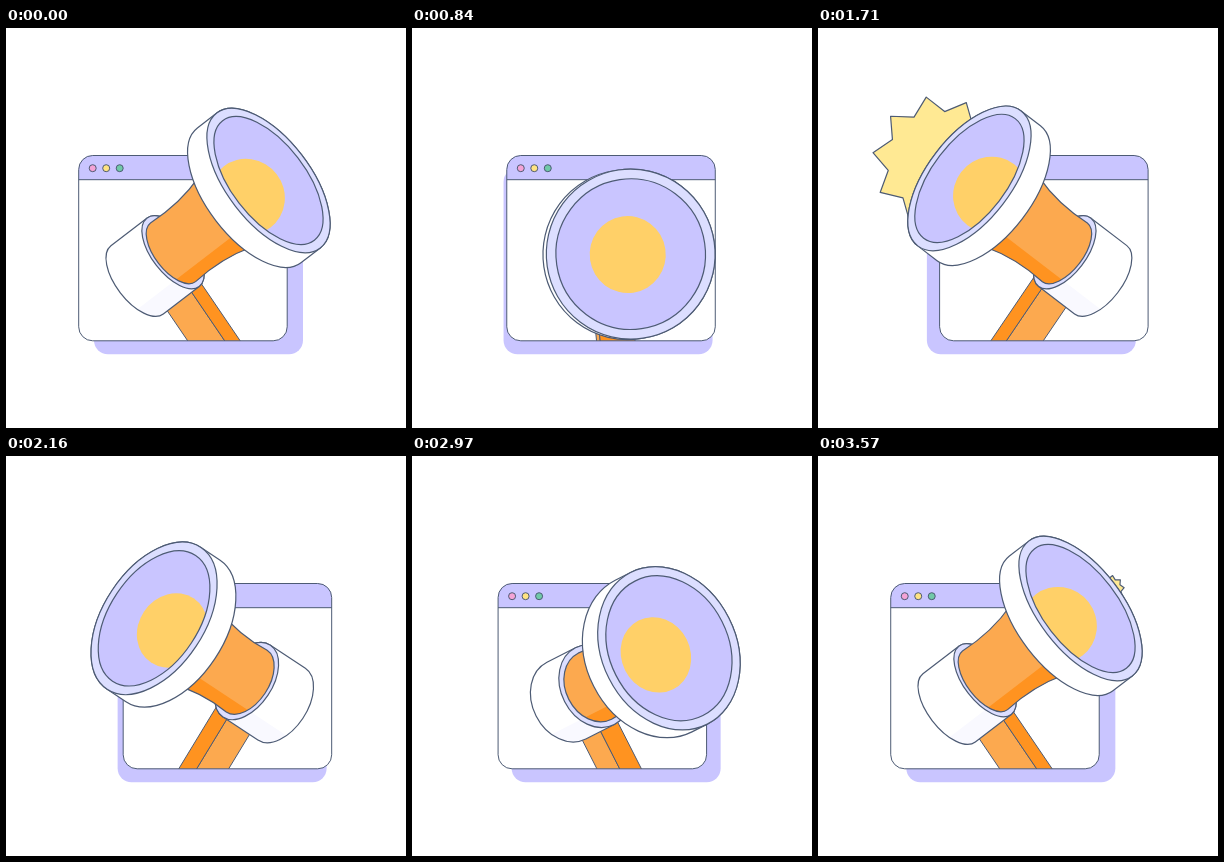
An HTML page with a canvas for the animation above (3600 ms loop, 400 px wide and 400 px high).

```html
<!DOCTYPE html>
<html lang="en">
<head>
<meta charset="utf-8">
<title>Megaphone</title>
<style>
html, body { margin: 0; width: 100%; height: 100%; overflow: hidden; background: #fff; }
canvas { display: block; width: 400px; height: 400px; }
</style>
</head>
<body>
<canvas></canvas>
<script>
const canvas = document.querySelector('canvas');
const ctx = canvas.getContext('2d');
const ratio = window.devicePixelRatio || 1;
canvas.width = canvas.height = 400 * ratio;

const LOOP = 3600, HALF = LOOP / 2, TAU = Math.PI * 2;
const LINE = '#4d5b74', LAVENDER = '#c9c5ff', PALE = '#dcdeff';
const ORANGE = '#fca94f', DARK = '#ff9320', DISC = '#ffd068', BURST = '#ffe993';

// Poses from facing the viewer (turn 0) to fully turned (turn 1):
// turn, rim x, y, axis x, y, ring x, y, disc depth, disc width,
// handle left, middle, right, slope
const POSES = [
  [0, 0, 228, 0, 0, 0, 232, 0, 1, -20, -20, 20, 0],
  [.346, 33, 219.4, .34, -.07, -9, 231, 8.7, .96, -17, -6, 20, .29],
  [.655, 51, 189.6, .56, -.29, -25, 230, 15, .89, -18, 5.5, 27, .52],
  [.83, 60, 172.5, .65, -.383, -29.5, 226, 18.5, .84, -17, 11.5, 31, .56],
  [1, 55.5, 151.3, .69, -.53, -40, 224.3, 27, .97, -21, 16, 31.5, .68]
];

function poseAt(turn) {
  const last = POSES.length - 1;
  let i = 0;
  while (i < last - 1 && POSES[i + 1][0] < turn) i++;
  const span = POSES[i + 1][0] - POSES[i][0], u = (turn - POSES[i][0]) / span;
  const tangent = (k, n) => {
    const a = POSES[Math.max(k - 1, 0)], b = POSES[Math.min(k + 1, last)];
    return (b[n] - a[n]) / (b[0] - a[0]) * span;
  };
  return POSES[i].map((p, n) => {
    const end = POSES[i + 1][n], m = tangent(i, n), w = tangent(i + 1, n);
    return p + u * (m + u * (3 * (end - p) - 2 * m - w + u * (2 * (p - end) + m + w)));
  });
}

// Swing from 1 to -1 and back, slow at both ends.
function swing(t) {
  let u = (t % HALF) / HALF;
  u += .02 * u * Math.sin(Math.PI * u) ** 2;
  const p = u < .5 ? .5 * (2 * u) ** 2.6 : 1 - .5 * (2 - 2 * u) ** 2.6;
  return (t < HALF ? 1 : -1) * (1 - 2 * p);
}

function paint(fill, stroke = true) {
  if (fill) { ctx.fillStyle = fill; ctx.fill(); }
  if (stroke) ctx.stroke();
}

function group(draw) {
  ctx.save();
  draw();
  ctx.restore();
}

function oval(x, y, rx, ry) {
  ctx.beginPath();
  ctx.ellipse(x, y, rx, ry, 0, 0, TAU);
}

// Side view of a cylinder whose front disc is centred at the origin.
function cylinder(depth, rx, ry) {
  ctx.beginPath();
  ctx.ellipse(-depth, 0, rx, ry, 0, Math.PI / 2, Math.PI * 1.5);
  ctx.ellipse(0, 0, rx, ry, 0, -Math.PI / 2, Math.PI / 2);
  ctx.closePath();
}

// Fill the lower side of the current path, then outline the path.
function shadeLower(color, path) {
  group(() => {
    ctx.clip();
    ctx.fillStyle = color;
    ctx.fillRect(-200, 23.5, 400, 100);
  });
  path();
  ctx.stroke();
}

function handle(side, left, middle, right, slope) {
  const bar = (a, b, color) => {
    ctx.beginPath();
    ctx.moveTo(a, 314);
    ctx.lineTo(a - slope * 74, 240);
    ctx.lineTo(b - slope * 74, 240);
    ctx.lineTo(b, 314);
    ctx.closePath();
    paint(color);
  };
  group(() => {
    ctx.beginPath();
    ctx.rect(0, 200, 400, 112.7);
    ctx.clip();
    ctx.translate(203.5, 0);
    ctx.scale(side, 1);
    bar(left, middle, ORANGE);
    bar(middle, right, DARK);
  });
}

function browser(phase, drawHandle) {
  const x = 97.3 - 24.6 * Math.cos(phase);
  const frame = () => {
    ctx.beginPath();
    ctx.roundRect(x, 127.5, 208.5, 185.3, 14);
  };
  ctx.lineWidth = 1;
  ctx.beginPath();
  ctx.roundRect(99 - 12.7 * Math.cos(phase - Math.PI / 6), 140, 209, 186.3, 14);
  paint(LAVENDER, false);
  frame();
  paint('#fff', false);
  group(() => {
    ctx.clip();
    ctx.beginPath();
    ctx.rect(x - 2, 125, 214, 26.7);
    paint(LAVENDER);
  });
  ['#f4a3d6', '#ffe382', '#70c9a8'].forEach((color, i) => {
    oval(x + 14 + 13.5 * i, 140.2, 3.5, 3.5);
    paint(color);
  });
  drawHandle();
  frame();
  ctx.stroke();
}

function burst(t, x, y) {
  const [start, peak, end] = t < 2400 ? [1170, 1420, 1870] : [2985, 3240, 3590];
  if (t <= start || t >= end) return;
  const size = t < peak
    ? 1 - (1 - (t - start) / (peak - start)) ** 2
    : 1 - ((t - peak) / (end - peak)) ** 3.2;
  const radius = 87 * size;
  const cx = x + 29 + .04 * radius, cy = y - 19.5 + .04 * radius;
  ctx.beginPath();
  for (let i = 0; i < 20; i++) {
    const r = radius * (i % 2 ? .77 : 1), a = .136 + i * Math.PI / 10;
    ctx.lineTo(cx + r * Math.cos(a), cy - r * Math.sin(a));
  }
  ctx.closePath();
  paint(BURST);
}

function megaphone(t, turn, pose) {
  const [, rimX, rimLevel, axisX, axisY, ringX, ringY, discDepth, discWidth] = pose;
  const rimY = rimLevel + 1.2 * turn; // the left swing rises a little higher
  const lean = Math.min(Math.hypot(axisX, axisY), 1);
  const flat = Math.sqrt(1 - lean * lean);
  const angle = Math.atan2(axisY, axisX);
  const length = 109 * lean;

  group(() => {
    ctx.lineWidth = 1.2;
    ctx.translate(207, 0);
    ctx.scale(turn < 0 ? -1 : 1, 1);
    burst(t, rimX, rimY);

    group(() => {
      ctx.translate(ringX, ringY);
      ctx.rotate(angle);
      const cap = () => cylinder(52 * lean, 43 * flat, 43);
      cap();
      paint('#fff', false);
      shadeLower('#f9f9ff', cap);
      oval(0, 0, 43 * flat, 43);
      paint(PALE);
      const neck = () => {
        ctx.beginPath();
        ctx.moveTo(length * .7, 44);
        ctx.quadraticCurveTo(length * .37, 34, 0, 37);
        ctx.ellipse(0, 0, 37 * flat, 37, 0, Math.PI / 2, Math.PI * 1.5);
        ctx.quadraticCurveTo(length * .37, -34, length * .7, -44);
      };
      neck();
      paint(ORANGE, false);
      shadeLower(DARK, neck);
    });

    ctx.translate(rimX, rimY);
    ctx.rotate(angle);
    cylinder(28 * lean, 85 * flat, 85);
    paint('#fff');
    oval(0, 0, 85 * flat, 85);
    paint(PALE);
    oval(0, 0, 75.3 * flat, 75.3);
    paint(LAVENDER, false);
    group(() => {
      ctx.clip();
      oval(-discDepth, 0, 38.5 * discWidth, 38.5);
      paint(DISC, false);
    });
    oval(0, 0, 75.3 * flat, 75.3);
    ctx.stroke();
  });
}

function draw(now) {
  const t = now % LOOP;
  const turn = swing(t);
  const pose = poseAt(Math.abs(turn));
  ctx.setTransform(ratio, 0, 0, ratio, 0, 0);
  ctx.fillStyle = '#fff';
  ctx.fillRect(0, 0, 400, 400);
  ctx.strokeStyle = LINE;
  ctx.lineJoin = 'round';
  browser(t / LOOP * TAU, () => handle(turn < 0 ? -1 : 1, ...pose.slice(9)));
  megaphone(t, turn, pose);
}

const began = performance.now();
function tick() {
  draw(performance.now() - began);
  requestAnimationFrame(tick);
}
tick();
</script>
</body>
</html>
```
